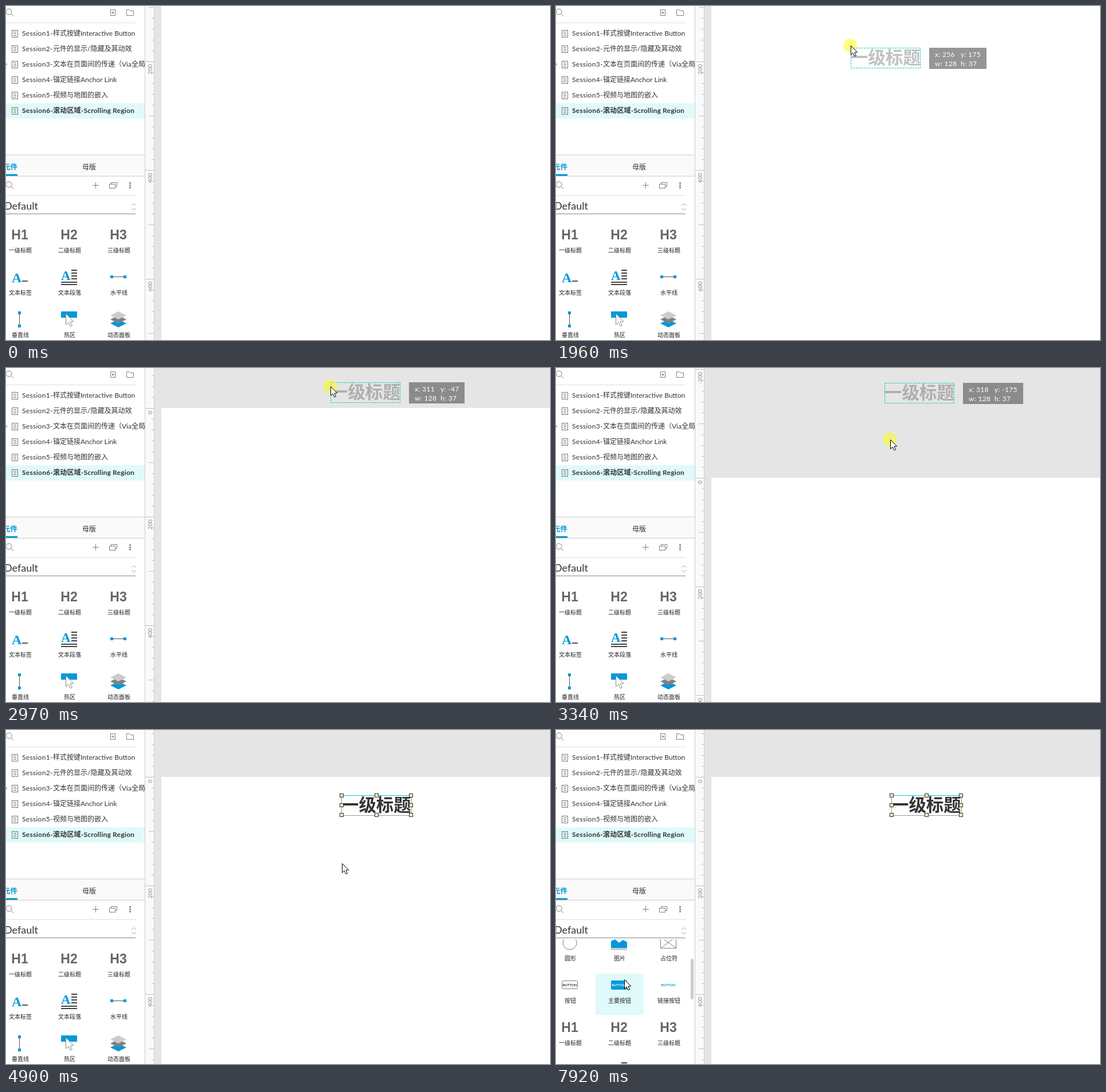
An HTML page with a canvas that plays this animation: 949 px wide and 584 px high, repeating every 7990 ms.

```html
<!DOCTYPE html>
<html lang="zh-CN">
<head>
<meta charset="utf-8">
<style>
html, body { margin: 0; width: 949px; height: 584px; overflow: hidden; background: #fff; }
canvas { display: block; }
</style>
</head>
<body>
<canvas id="stage" width="949" height="584"></canvas>
<script>
const ctx = document.getElementById('stage').getContext('2d');
const LOOP = 7990, SCALE = 0.95, PAGE_X = 271;
const BLUE = '#0099d9', HOVER = '#e0fafa', CYAN = '#00cccc', GREY = '#808080';
const UI = 'Lato, "Noto Sans CJK SC", "Noto Sans CJK", sans-serif';
const CJK = '"Noto Sans CJK SC", "Noto Sans CJK", sans-serif';

// drawing helpers
function rect(x, y, w, h, color) { ctx.fillStyle = color; ctx.fillRect(x, y, w, h); }
function box(x, y, w, h, color = GREY) {
  ctx.strokeStyle = color;
  ctx.strokeRect(x + 0.5, y + 0.5, w, h);
}
function round(x, y, w, h, r, fill, stroke) {
  ctx.beginPath();
  ctx.roundRect(x, y, w, h, r);
  if (fill) { ctx.fillStyle = fill; ctx.fill(); }
  if (stroke) { ctx.strokeStyle = stroke; ctx.stroke(); }
}
function path(points, stroke, fill, close = !!fill) {
  ctx.beginPath();
  points.forEach(([x, y]) => ctx.lineTo(x, y));
  if (close) ctx.closePath();
  if (fill) { ctx.fillStyle = fill; ctx.fill(); }
  if (stroke) { ctx.strokeStyle = stroke; ctx.stroke(); }
}
function circle(x, y, r, stroke, fill) {
  ctx.beginPath();
  ctx.arc(x, y, r, 0, 7);
  if (fill) { ctx.fillStyle = fill; ctx.fill(); }
  if (stroke) { ctx.strokeStyle = stroke; ctx.stroke(); }
}
function text(s, x, y, font, color = '#333', align = 'left', spacing = 0) {
  ctx.font = font;
  ctx.fillStyle = color;
  ctx.textAlign = align;
  ctx.letterSpacing = spacing + 'px';
  ctx.fillText(s, x, y);
}
function at(x, y, draw) { ctx.save(); ctx.translate(x, y); draw(); ctx.restore(); }

const bursts = [[0, 0, 1], [70, 850, 11], [930, 1710, 11], [1790, 2530, 10], [2590, 3340, 10],
  [3370, 3370, 1], [3430, 3590, 3], [3800, 3890, 2], [5510, 6280, 11], [7690, 7920, 4]];
const cursorKeys = [[70, 671, 543], [500, 230, 470], [850, 20, 428], [930, 20, 428],
  [1390, 313.5, 246], [1710, 479, 105], [2250, 556, 26], [2660, 562, 25], [3260, 572, 40],
  [3340, 583, 125], [3370, 583, 140], [3590, 584, 234], [3800, 584, 234], [3890, 586, 233],
  [5430, 586, 233], [5850, 260, 400], [6050, 56, 482], [6280, 86, 510], [7610, 86, 510], [7920, 119, 436]];
const ghostKeys = [[930, 10, 437], [1390, 303, 253.5], [1710, 479, 112], [2250, 556, 27],
  [2660, 562, 25], [3340, 573, 26], [3370, 575, 147], [3590, 585, 241]];
const originKeys = [[0, -93], [2366, -93], [2660, -7], [3340, 192], [3370, 209]];

function heldTime(t) {
  const [start, end, steps] = bursts.findLast(b => t >= b[0]);
  if (steps < 2) return start;
  const step = (end - start) / (steps - 1);
  return Math.min(end, start + Math.floor((t - start + 14) / step) * step);
}
function sample(keys, t) {
  const i = keys.findIndex(k => k[0] > t);
  if (i < 0) return keys.at(-1).slice(1);
  if (i === 0) return keys[0].slice(1);
  const a = keys[i - 1], b = keys[i], p = (t - a[0]) / (b[0] - a[0]);
  return a.slice(1).map((v, j) => v + (b[j + 1] - v) * p);
}
function pageOrigin(t, held) {
  if (t >= 4900) return 82;
  if (t >= 4520) return 19;
  if (t >= 4350) return 82;
  if (t >= 4200) return 145;
  return Math.round(sample(originKeys, held)[0]);
}
const listScroll = t => 40 * [6740, 6820, 7290].filter(s => t >= s).length;

// widget library, each icon drawn around its own centre
const heading = s => () => text(s, 0, 8, 'bold 23px "Liberation Sans", sans-serif', '#666', 'center');
const serifA = (y, size) => text('A', -14, y, `bold ${size}px "Liberation Serif", serif`, BLUE);
const buttonText = color => text('BUTTON', 0, 2, `bold 6px ${UI}`, color, 'center');
const diamond = (y, color) => path([[-14, y], [0, y - 7], [14, y], [0, y + 7]], null, color);
const widgets = [
  ['圆形', () => circle(0, 0, 12, GREY)],
  ['图片', () => {
    path([[-14, 9], [-14, -3], [-7, -6], [0, 0], [7, -5], [14, -1], [14, 9]], null, BLUE);
    rect(-14, 9, 28, 4, '#ccc');
  }],
  ['占位符', () => {
    box(-14, -11, 27, 20);
    path([[-13.5, -10.5], [13.5, 9.5]], GREY);
    path([[13.5, -10.5], [-13.5, 9.5]], GREY);
  }],
  ['按钮', () => { round(-13.5, -7.5, 27, 14, 2, '#fff', GREY); buttonText('#333'); }],
  ['主要按钮', () => { round(-14, -8, 28, 16, 2, BLUE); buttonText('#fff'); }],
  ['链接按钮', () => buttonText(BLUE)],
  ['一级标题', heading('H1')],
  ['二级标题', heading('H2')],
  ['三级标题', heading('H3')],
  ['文本标签', () => { serifA(9, 24); rect(4, 6, 10, 2, '#555'); }],
  ['文本段落', () => {
    serifA(5, 23);
    for (let y = -13; y < 5; y += 5) rect(4, y, 10, 2, '#444');
    rect(-14, 8, 28, 2, '#444');
    rect(-14, 12, 28, 2, '#444');
  }],
  ['水平线', () => { rect(-12, -1, 24, 1, '#555'); rect(-14, -3, 5, 5, BLUE); rect(9, -3, 5, 5, BLUE); }],
  ['垂直线', () => { rect(-1, -12, 1, 24, '#555'); rect(-3, -14, 5, 5, BLUE); rect(-3, 9, 5, 5, BLUE); }],
  ['热区', () => { rect(-14, -14, 28, 11, BLUE); arrow(-5.5, -10, 1.2, '#888'); }],
  ['动态面板', () => { diamond(7, BLUE); diamond(0, GREY); diamond(-7, '#ccc'); }],
];

function arrow(x, y, size, stroke) {
  const shape = [[0, 0], [0, 16], [3.7, 12.6], [6.4, 18.4], [9, 17.2], [6.4, 11.6], [11.2, 11.4]];
  path(shape.map(([px, py]) => [x + px * size, y + py * size]), stroke, '#fff');
}
function searchIcon(y) {
  circle(5, y, 5, GREY);
  path([[8.5, y + 3.5], [13, y + 8]], GREY);
}

const sessions = [['1', '样式按键Interactive Button'], ['2', '元件的显示/隐藏及其动效'],
  ['3', '文本在页面间的传递（Via全局变量）'], ['4', '锚定链接Anchor Link'],
  ['5', '视频与地图的嵌入'], ['6', '滚动区域-Scrolling Region']];

function drawPages() {
  searchIcon(10);
  box(182, 6, 8, 10);
  rect(184, 11, 5, 1, GREY);
  rect(186, 9, 1, 5, GREY);
  path([[210.5, 16.5], [210.5, 6.5], [215, 6.5], [217, 8.5], [222.5, 8.5], [222.5, 16.5]], GREY, null, true);
  rect(0, 29, 227, 1, '#e0e0e0');
  rect(0, 170, 242, 27, HOVER);
  path([[-1, 99], [2, 102], [-1, 105]], null, GREY);
  sessions.forEach(([n, title], i) => {
    const y = 48 + 27 * i, font = `${i === 5 ? 'bold ' : ''}12px ${UI}`;
    box(10, y - 6, 10, 12, '#777');
    for (let k = -3; k < 5; k += 3) rect(13, y + k, 5, 1, '#777');
    text(`Session${n}-`, 28, y + 4, font, '#333', 'left', 0.3);
    text(title, 82, y + 4, font, '#333', 'left', i === 5 ? 0.2 : 0);
  });
}

function drawLibraryHeader() {
  rect(0, 260, 242, 38, '#fafafa');
  rect(0, 260, 242, 1, '#ccc');
  rect(0, 297, 242, 1, '#ccc');
  text('元件', 20, 286, `bold 12.5px ${CJK}`, BLUE, 'right');
  rect(0, 294, 20, 3, BLUE);
  text('母版', 133, 286, `12px ${CJK}`);
  searchIcon(312);
  rect(151, 313, 11, 1, GREY);
  rect(156, 308, 1, 11, GREY);
  path([[183.5, 311], [183.5, 308.5], [193.5, 308.5], [193.5, 315.5], [191, 315.5]], GREY);
  box(180, 311, 10, 7);
  for (let y = 309; y < 318; y += 4) circle(216.5, y + 0.5, 1.5, null, '#777');
  rect(0, 331, 227, 1, '#e0e0e0');
  text('Default', -3, 356, `18px ${UI}`);
  path([[219, 349], [223, 345.5], [227, 349]], '#aaa');
  path([[219, 353.5], [223, 357], [227, 353.5]], '#aaa');
  rect(0, 363, 226, 1, '#888');
}

function drawLibrary(scroll, pointer) {
  ctx.save();
  ctx.beginPath();
  ctx.rect(0, 366, 242, 218);
  ctx.clip();
  widgets.forEach(([label, icon], i) => {
    const col = i % 3, y = 279 + 74 * Math.floor(i / 3) + scroll;
    const left = -17 + 86 * col, top = y - 47.5;
    const inside = pointer && pointer[0] >= left && pointer[0] < left + 86
      && pointer[1] >= top && pointer[1] < top + 74;
    if (inside) round(left, top, 84, 73, 3, HOVER);
    at(24 + 86 * col, y - 27, icon);
    text(label, 25 + 86 * col, y + 4, `10px ${CJK}`, '#222', 'center');
  });
  if (pointer) round(235, 430 - scroll / 4, 5, 71, 2.5, '#ccc');
  ctx.restore();
}

function drawCanvas(origin) {
  rect(259, 0, 690, 584, '#e5e5e5');
  rect(PAGE_X, Math.max(0, origin), 678, 584, '#fff');
  rect(242, 0, 17, 584, '#fafafa');
  rect(242, 0, 1, 584, '#ccc');
  rect(258, 0, 1, 584, '#ccc');
  for (let n = -20; n < 50; n++) {
    const y = origin + 19 * n, major = n % 10 === 0;
    const x = major ? 243 : n % 5 === 0 ? 249 : 254;
    rect(x, y, 258 - x, 1, '#c0c0c0');
    if (major) at(254.5, y + 5, () => {
      ctx.rotate(-Math.PI / 2);
      text(String(n * 20), 0, 0, `10px ${UI}`, '#888', 'right');
    });
  }
}

function drawTitle(x, y, color) { text('一级标题', x, y + 28, `bold 30.4px ${CJK}`, color); }

function drawGhost([x, y], origin) {
  const left = Math.round(x), top = Math.floor(y);
  drawTitle(left, top, 'rgba(51,51,51,.3)');
  ctx.setLineDash([3, 1.5]);
  box(left, top, 121, 35, CYAN);
  ctx.setLineDash([]);
  const font = `12px ${UI}`, tip = left + 137;
  const yLabel = 'y: ' + Math.round((y - origin) / SCALE);
  ctx.font = font;
  ctx.letterSpacing = '0.3px';
  rect(tip, top, Math.round(65 + ctx.measureText(yLabel).width), 37, 'rgba(80,80,80,.6)');
  [['x: ' + Math.round((x - PAGE_X) / SCALE), yLabel], ['w: 128', 'h: 37']].forEach((row, i) =>
    row.forEach((s, j) => text(s, tip + 10 + 45 * j, top + 16 + 16 * i, font, '#fff', 'left', 0.3)));
}

function drawSelected(x, y) {
  drawTitle(x, y, '#333');
  box(x, y, 122, 35, '#999');
  rect(x, y, 122, 1, CYAN);
  for (const dx of [0, 61, 121]) for (const dy of [0, 17, 34]) {
    if (dx === 61 && dy === 17) continue;
    rect(x + dx - 2, y + dy - 2, 5, 5, '#ffe9b8');
    box(x + dx - 3, y + dy - 3, 6, 6, '#333');
  }
}

function draw(t) {
  const held = heldTime(t), origin = pageOrigin(t, held);
  const cursor = sample(cursorKeys, held).map(Math.round);
  const pressed = t >= 930 && t < 3890, dragging = t >= 930 && t < 3800;
  const overList = t >= 70 && !pressed && cursor[0] < 242 && cursor[1] > 366;
  ctx.lineWidth = 1;
  rect(0, 0, 949, 584, '#fff');
  drawPages();
  drawLibraryHeader();
  drawLibrary(listScroll(t), overList && cursor);
  drawCanvas(origin);
  if (dragging) drawGhost(sample(ghostKeys, held), origin);
  else if (t >= 3800) drawSelected(585, origin + 32);
  if (pressed) circle(cursor[0] - 0.5, cursor[1], 12, null, 'rgba(255,255,0,.5)');
  if (t >= 70) arrow(cursor[0] + 0.5, cursor[1] + 0.5, 1, '#000');
}

function frame() {
  draw(performance.now() % LOOP);
  requestAnimationFrame(frame);
}
frame();
</script>
</body>
</html>
```
